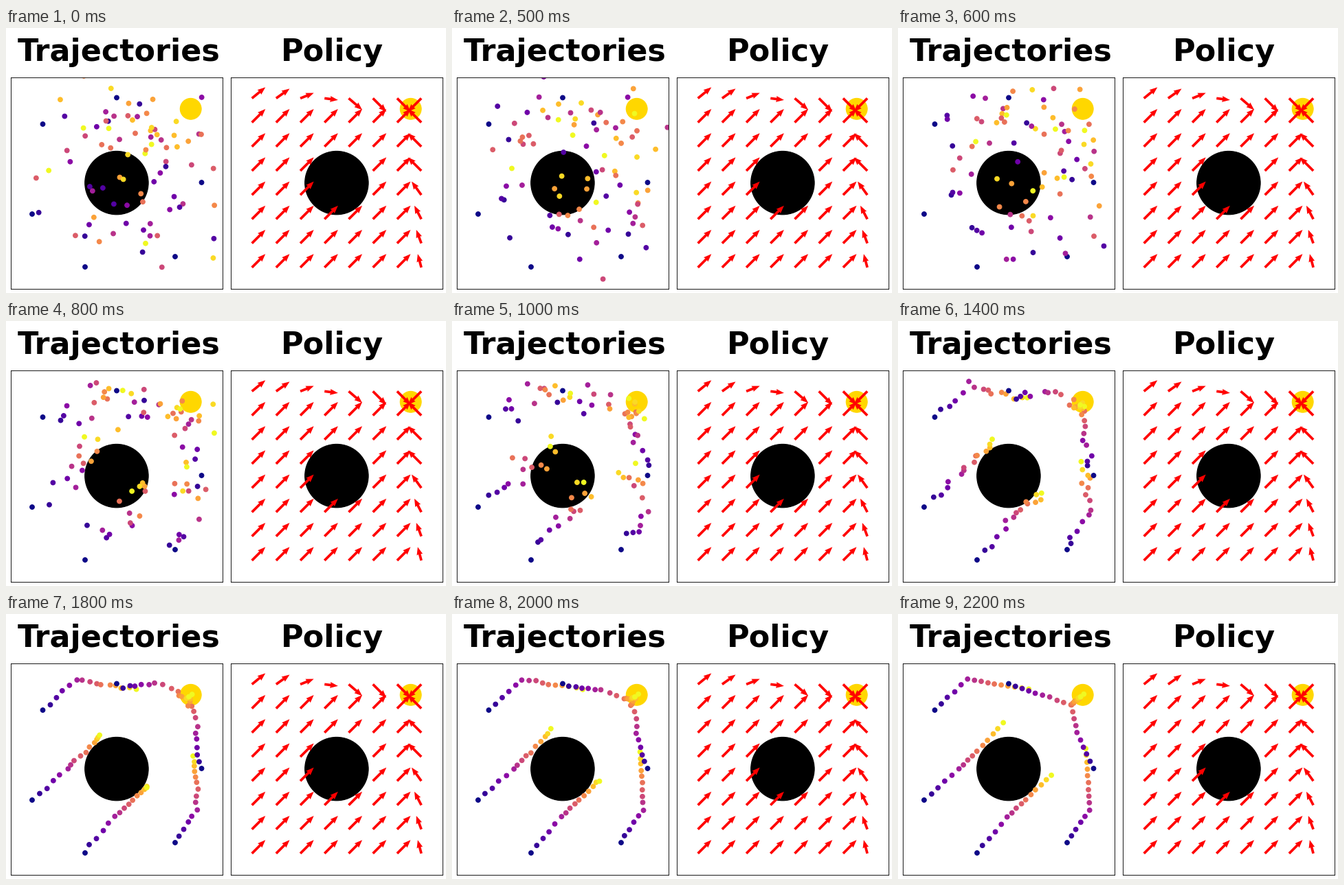
Animation, 640 px wide and 386 px high, one loop 3300 ms. Source, as a matplotlib script:

```python
import numpy as np
import matplotlib.pyplot as plt
from matplotlib.animation import FuncAnimation
from matplotlib.patches import Circle

W, H, DPI = 640, 386, 80
HALF = 154          # half the side of a panel, in pixels
LEFT, RIGHT, CY = 160.9, 480.9, 225.6
HOLD, STEPS, FRAMES = 5, 18, 33

POINTS = 15
KNOTS = [0, 5, 9, 14]       # point indices of the key points below
PATHS = [
    [(53.5, 140), (101, 94), (140, 101), (190, 109)],
    [(38, 271), (88, 226), (115, 200), (153, 158)],
    [(115, 348), (159, 296), (186, 270), (223, 235)],
    [(246, 333), (279, 285), (277, 246), (274, 196)],
    [(284.5, 225), (261, 173), (252, 132), (271, 117)],
    [(161, 101.5), (210, 118), (252, 132), (266, 120)],
]

# How far a path still is from its settled shape, and where along it.
t = np.linspace(0, 1, POINTS)
TAIL, MIDDLE = t**6, np.sin(np.pi * t)**2
BENDS = {1: (TAIL, (-17, 19)), 2: (TAIL, (-18, 17)), 3: (TAIL, (0, 11)),
         4: (MIDDLE, (22, 0)), 5: (MIDDLE, (-4, -22))}


def sample(keys):
    """Spread the points of one path between its key points."""
    return np.column_stack([np.interp(np.arange(POINTS), KNOTS, axis)
                            for axis in zip(*keys)])


def make_noise(keep=0.7, seed=11):
    """Noise that partly carries over from one step to the next."""
    rng = np.random.default_rng(seed)
    noise = rng.standard_normal((STEPS + 1, len(PATHS), POINTS, 2))
    for k in range(1, STEPS + 1):
        noise[k] = keep * noise[k - 1] + np.sqrt(1 - keep**2) * noise[k]
    return noise


def positions(k):
    """Denoise: drawn to the centre and scattered at first, then on the paths."""
    blur = np.exp(-0.26 * k)
    shape = paths + bends * np.interp(k, [14, STEPS], [1, 0])
    drift = 0.3 * blur * ((LEFT, CY) - shape) + 46 * blur * noise[k]
    drift[:, 0] = 0         # the starting points are fixed
    return (shape + drift).reshape(-1, 2)


def panel(cx, title, title_x):
    ax = fig.add_axes([(cx - HALF) / W, 1 - (CY + HALF) / H,
                       2 * HALF / W, 2 * HALF / H])
    ax.set(xlim=(cx - HALF, cx + HALF), ylim=(CY + HALF, CY - HALF),
           xticks=[], yticks=[])
    ax.add_patch(Circle((cx, CY), 0.3 * HALF, color="black", zorder=1))
    ax.add_patch(Circle((cx + 0.7 * HALF, CY - 0.7 * HALF), 0.1 * HALF,
                        color="gold", zorder=1))
    fig.text(title_x / W, 1 - 48 / H, title, fontsize=40, weight="bold",
             family="DejaVu Sans", ha="left", va="baseline")
    return ax


def draw_policy(ax):
    n = np.arange(8)
    grid = HALF * np.linspace(-0.8, 0.8, 8)
    x, y = np.meshgrid(grid, grid)
    u, v = np.ones((8, 8)), -np.ones((8, 8))
    v[0] = np.minimum(1, 0.105 * n**2 - 0.82)
    u[:, -1] = -np.minimum(1, np.exp(-0.33 * (n - 3)))
    free = np.hypot(x, y) > 0.3 * HALF
    ax.quiver(RIGHT + x[free], CY + y[free], 19.6 * u[free], 19.6 * v[free],
              color="red", angles="xy", scale_units="xy", scale=1,
              units="dots", width=3.7, headwidth=2.4, headlength=3.1,
              headaxislength=2.9, zorder=3)


fig = plt.figure(figsize=(W / DPI, H / DPI), dpi=DPI, facecolor="white")
paths = np.array([sample(keys) for keys in PATHS])
bends = np.zeros_like(paths)
for i, (weight, shift) in BENDS.items():
    bends[i] = np.outer(weight, shift)
noise = make_noise()

left = panel(LEFT, "Trajectories", 16.6)
right = panel(RIGHT, "Policy", 400)
draw_policy(right)
dots = left.scatter(*positions(0).T, c=plt.cm.plasma(np.tile(t, len(PATHS))),
                    s=36, zorder=2)


def update(frame):
    k = min(max(frame - HOLD + 1, 0), STEPS)
    dots.set_offsets(positions(k))
    return [dots]


anim = FuncAnimation(fig, update, frames=FRAMES, interval=100,
                     repeat=True, repeat_delay=0, blit=False)
plt.show()
```
